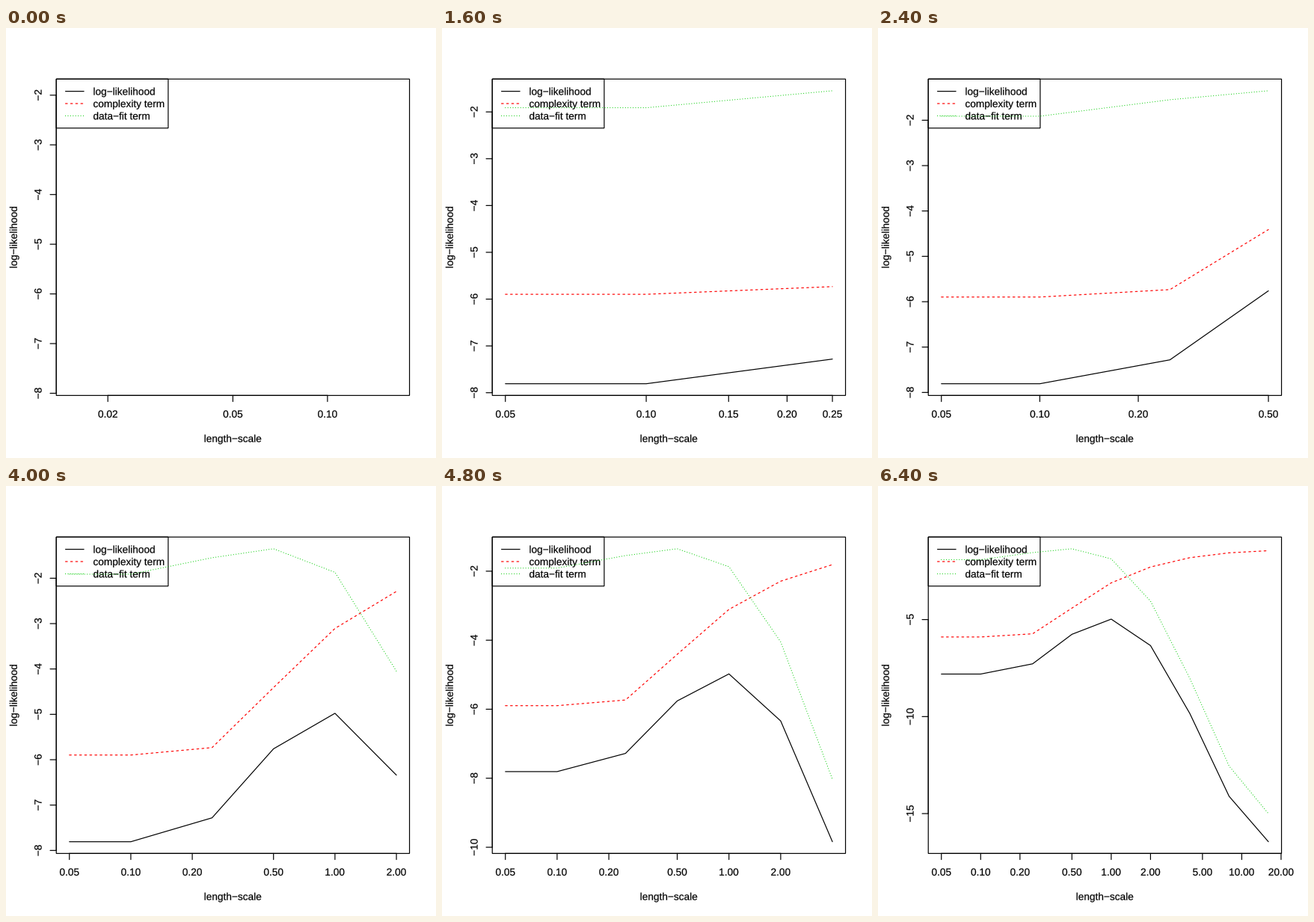
These frames come from a looping animation (575 px wide and 575 px high, 7200 ms). A matplotlib script:

```python
import numpy as np
import matplotlib.pyplot as plt
from matplotlib.animation import FuncAnimation
from matplotlib.patches import PathPatch, Rectangle
from matplotlib.textpath import TextPath
from matplotlib.transforms import Affine2D

SIZE, DPI = 575, 100
PT = 82 / 72                 # pixels per layout point
LINE = 14.4 * PT             # height of one text line
PX = 72 / DPI                # one pixel as a matplotlib width
STROKE = 1.2 * PX
DASH = 0.75 * PT * PX / STROKE   # dash unit relative to the stroke
LEFT, RIGHT = 59.04 * PT, 473.76 * PT
BOTTOM, TOP = 73.44 * PT, 444.96 * PT
MINUS = "\u2212"

plt.rcParams["font.family"] = "Liberation Sans"

scale = np.array([0.05, 0.1, 0.25, 0.5, 1, 2, 4, 8, 16])
complexity = np.array([-5.897, -5.897, -5.733, -4.41, -3.107,
                       -2.29, -1.81, -1.56, -1.45])
fit = np.array([-1.911, -1.911, -1.548, -1.35, -1.87,
                -4.05, -8.03, -12.55, -15.0])
total = complexity + fit

STYLES = [
    ("log-likelihood", total, "black", "-"),
    ("complexity term", complexity, "red", (0, (3 * DASH, 5 * DASH))),
    ("data-fit term", fit, "#00cd00", (0, (0.05 * DASH, 3.95 * DASH))),
]

fig = plt.figure(figsize=(SIZE / DPI, SIZE / DPI), dpi=DPI, facecolor="white")
ax = fig.add_axes([0, 0, 1, 1])


def rule(x, y, color="black", style="-"):
    ax.plot(x, y, color=color, ls=style, lw=STROKE, snap=False,
            dash_capstyle="round", solid_capstyle="round",
            solid_joinstyle="round")


def label(x, y, text, center=True, upright=False):
    path = TextPath((0, 0), text.replace("-", MINUS), size=12 * PT)
    move = Affine2D()
    if center:
        box = path.get_extents()
        move.translate(-(box.x0 + box.x1) / 2, 0)
    if upright:
        move.rotate_deg(90)
    move.translate(x, y)
    ax.add_patch(PathPatch(move.transform_path(path), fc="black", ec="black",
                           lw=0.2 * PX, snap=False))


def frame_box(x, y, w, h):
    ax.add_patch(Rectangle((x, y), w, h, fill=False, ec="black",
                           lw=STROKE, snap=False))


def expand(lo, hi):
    pad = 0.04 * (hi - lo)
    return lo - pad, hi + pad


def x_range(n):
    lo, hi = np.log10(scale[0]), np.log10(scale[n - 1])
    if n == 1:
        lo, hi = 1.4 * lo, 0.6 * lo
    return expand(lo, hi)


def x_ticks(n, lo, hi):
    if n == 2:
        ticks = np.arange(5, 11) / 100
    elif n == 3:
        ticks = np.arange(1, 6) / 20
    else:
        ticks = np.array([m * 10.0 ** e for e in (-2, -1, 0, 1) for m in (1, 2, 5)])
    logs = np.log10(ticks)
    return ticks[(logs >= lo) & (logs <= hi)]


def y_ticks(lo, hi):
    span = hi - lo
    step = 1 if span < 8 else 2 if span < 15 else 5
    return np.arange(np.ceil(lo / step), np.floor(hi / step) + 1) * step


def draw_x_axis(ticks, xs):
    rule(xs[[0, -1]], [BOTTOM, BOTTOM])
    for v, x in zip(ticks, xs):
        rule([x, x], [BOTTOM, BOTTOM - LINE / 2])
        label(x, BOTTOM - 1.8 * LINE, f"{v:.2f}")
    label((LEFT + RIGHT) / 2, BOTTOM - 3.8 * LINE, "length-scale")


def draw_y_axis(ticks, ys):
    rule([LEFT, LEFT], ys[[0, -1]])
    for v, y in zip(ticks, ys):
        rule([LEFT, LEFT - LINE / 2], [y, y])
        label(LEFT - 1.2 * LINE, y, f"{v:.0f}", upright=True)
    label(LEFT - 3.2 * LINE, (BOTTOM + TOP) / 2, "log-likelihood", upright=True)


def draw_legend():
    frame_box(LEFT, TOP - 4 * LINE, 131.4 * PT, 4 * LINE)
    x = LEFT + 10.8 * PT
    for i, (name, _, color, style) in enumerate(STYLES, 1):
        y = TOP - i * LINE
        rule([x, x + 21.6 * PT], [y, y], color, style)
        label(x + 32.4 * PT, y - 4.3 * PT, name, center=False)


def draw(i):
    n = i + 1
    ax.clear()
    ax.set(xlim=(0, SIZE), ylim=(0, SIZE))
    ax.axis("off")

    x0, x1 = x_range(n)
    y0, y1 = expand(total[:n].min(), max(fit[:n].max(), complexity[:n].max()))

    def to_x(v):
        return LEFT + (np.log10(v) - x0) / (x1 - x0) * (RIGHT - LEFT)

    def to_y(v):
        return BOTTOM + (v - y0) / (y1 - y0) * (TOP - BOTTOM)

    frame_box(LEFT, BOTTOM, RIGHT - LEFT, TOP - BOTTOM)
    ticks = x_ticks(n, x0, x1)
    draw_x_axis(ticks, to_x(ticks))
    ticks = y_ticks(y0, y1)
    draw_y_axis(ticks, to_y(ticks))
    draw_legend()
    if n > 1:
        for _, values, color, style in STYLES:
            rule(to_x(scale[:n]), to_y(values[:n]), color, style)
    return []


anim = FuncAnimation(fig, draw, frames=len(scale), init_func=lambda: draw(0),
                     interval=800, repeat=True, repeat_delay=0, blit=False)
plt.show()
```
